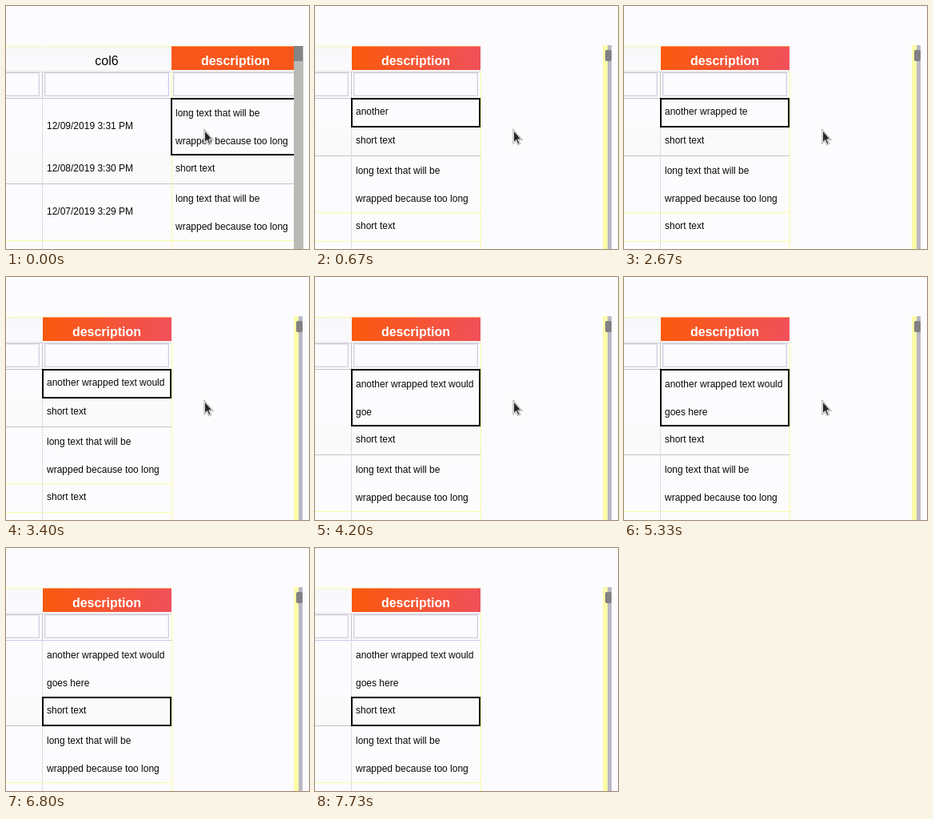
These frames come from a looping animation (379 by 304 pixels, 7.79 s). An HTML page:

```html
<!DOCTYPE html>
<html lang="en">
<head>
<meta charset="utf-8">
<title>Table editing</title>
<style>
html, body { margin: 0; width: 100%; height: 100%; overflow: hidden; background: #fcfcfe; }
svg { display: block; width: 379px; height: 304px; }
text { font: 12px "Liberation Sans", Arial, sans-serif; fill: #080808; white-space: pre; }
.head { font-size: 16px; text-anchor: middle; }
.active { font-weight: bold; fill: #fff; }
</style>
</head>
<body>
<svg viewBox="0 0 379 304">
  <defs>
    <linearGradient id="hot"><stop stop-color="#fb590c"/><stop offset="1" stop-color="#f0505a"/></linearGradient>
    <linearGradient id="soft" x1="0" y1="0" x2="0" y2="1"><stop stop-color="#f6f7f9"/><stop offset="1" stop-color="#fbfbfd"/></linearGradient>
    <clipPath id="view"><rect y="40" width="360" height="264"/></clipPath>
    <path id="arrow" d="M248.500 156V170.500L251.700 167.600L254 173L256 172.200L253.800 166.800H257.800Z"/>
  </defs>
  <rect width="379" height="304" fill="#fcfcfe"/>
  <g id="table" clip-path="url(#view)"></g>
  <g id="bar"></g>
  <g id="cursor">
    <use href="#arrow" fill="none" stroke="#b4b3b2" stroke-width="2.400"/>
    <use href="#arrow" fill="#28272c" stroke="#eeeeec" stroke-width=".9"/>
  </g>
</svg>
<script>
const LOOP = 7790, SHIFT = 70, LEAVE = 5470, TOP = 115;
const LONG = ["long text that will be", "wrapped because too long"];
const DATES = ["12/09/2019 3:31 PM", "12/08/2019 3:30 PM", "12/07/2019 3:29 PM"];
const GREY = "#c3c2c8", FAINT = "#dddce2", PALE = "#fafaa8", LILAC = "#cfc6e8";
const table = document.getElementById("table");
const bar = document.getElementById("bar");
const cursor = document.getElementById("cursor");

// Typing bursts: text, time of first key, time of last key
const bursts = [
  ["another", 70, 670], [" wrapp", 930, 1470], ["e", 1870, 1870], ["d", 2200, 2200],
  [" te", 2400, 2670], ["xt would", 2870, 3400], [" goe", 3730, 4200], ["s here", 5000, 5330]
];
const tick = t => Math.round(Math.round(t * 15 / 1000) * 100 / 15) * 10;
const keys = bursts.flatMap(([s, from, to]) =>
  [...s].map((c, i) => [c, tick(from + (to - from) * i / Math.max(1, s.length - 1))]));
const typed = t => keys.filter(k => k[1] <= t).map(k => k[0]).join("");

const rect = (x, y, w, h, fill, extra = "") =>
  `<rect x="${x}" y="${y}" width="${w}" height="${h}" fill="${fill}" ${extra}/>`;
const frame = (x, y, w, h, color, size) =>
  rect(x, y, w, h, "none", `stroke="${color}" stroke-width="${size}"`);
const label = (x, y, s, cls = "") => `<text x="${x}" y="${y}" class="${cls}">${s}</text>`;

function header(x, name, fill = "url(#soft)") {
  const active = name === "description";
  let out = rect(x + 1, 50, 161, 30, fill);
  out += rect(x + 1, 50, 161, 1, active ? "#fb9a55" : PALE);
  out += rect(x, 80, 162, 1, "#f3eeee") + rect(x, 82, 162, 1, "#d6d5da");
  out += frame(x + 3.5, 83.5, 155, 29, "#d3d0de", 1) + frame(x + 4.5, 84.5, 153, 27, "#ececf2", 1);
  return out + label(x + 81, 74, name, active ? "head active" : "head");
}

function draw(shifted, text, left) {
  const x = shifted ? 45 : 206, right = x + 162;
  const wraps = text.startsWith("another wrapped text would g");
  const first = !shifted ? LONG : wraps ? [text.slice(0, 26), text.slice(27)] : [text];
  const rows = [first, ["short text"], LONG, ["short text"]];
  let out = header(-117, "");
  if (!shifted) out += header(45, "col6");
  out += header(x, "description", shifted ? "url(#hot)" : "#f8561a");
  out += rect(0, TOP, right, 1, left ? LILAC : GREY);
  let y = TOP, mark = "";
  rows.forEach((lines, i) => {
    const two = lines.length > 1, h = two ? 71 : 36;
    if (i === 1) out += rect(0, y, right, h, "#fafafa");
    lines.forEach((s, n) => { out += label(x + 6, y + (two ? 23 : 21) + 35 * n, s); });
    if (!shifted && DATES[i]) out += label(51, y + (two ? 39 : 21), DATES[i]);
    out += rect(0, y + h, right, 1, i === 1 || (i === 0 && shifted) ? GREY : PALE);
    if (i === (left ? 1 : 0)) mark = frame(x + 1, y + 1, 160, h - 1, "#000", 2);
    y += h;
  });
  out += rect(45, 82, 1, 33, GREY) + rect(45, TOP, 1, 190, FAINT);
  out += rect(x + (shifted ? 162 : 1), 82, 1, 222, PALE);
  table.innerHTML = out + mark;
  bar.innerHTML = shifted
    ? rect(360, 49, 6, 255, "#fcfcaa") + rect(366, 49, 5, 255, "#bab9c4") + rect(363, 55, 8, 14, "#828184", 'rx="2"')
    : rect(360, 50, 12, 254, "#bab9b6") + rect(360, 50, 11, 19, "#858487");
  cursor.style.display = left ? "none" : "";
}

let last = "";
function update(now) {
  const t = now % LOOP;
  const shifted = t >= SHIFT, text = typed(t), left = t >= LEAVE;
  const state = [shifted, text, left].join("|");
  if (state !== last) draw(shifted, text, left);
  last = state;
}

const start = performance.now();
function loop() {
  update(performance.now() - start);
  requestAnimationFrame(loop);
}
loop();
</script>
</body>
</html>
```
